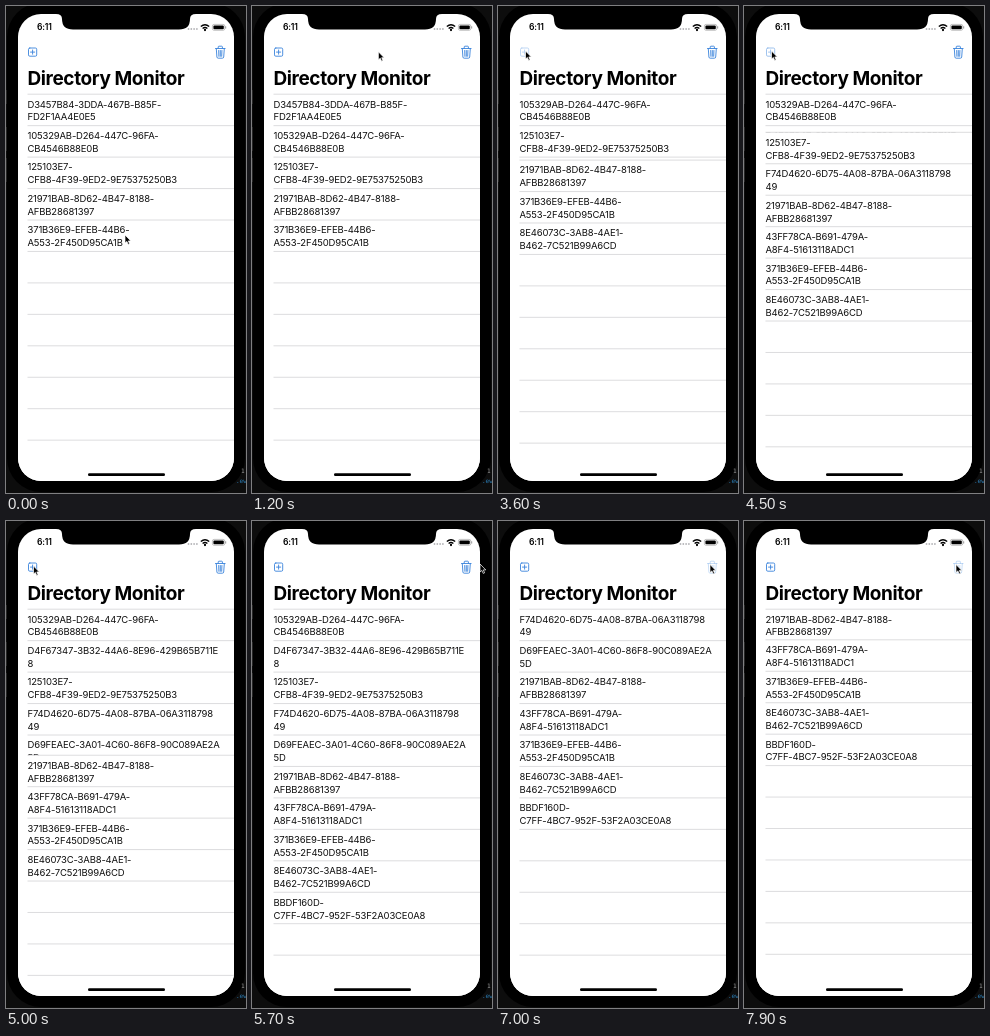
Animation of 240x487 px, one loop 8000 ms. Source, as an HTML page:

```html
<!DOCTYPE html>
<html lang="en">
<head>
<meta charset="utf-8">
<title>Directory Monitor</title>
<style>
  html, body { margin: 0; width: 100%; height: 100%; overflow: hidden; background: #0d0d0d; }
  svg { display: block; width: 100%; height: 100%; }
  text { font-family: Inter, "Liberation Sans", sans-serif; fill: #000; }
  .row text { font-size: 9.5px; letter-spacing: -.18px; fill: #111; }
  .row line { stroke: #d4d4d6; stroke-width: .8; }
  .title { font-size: 19px; font-weight: 700; letter-spacing: -.4px; }
  .clock { font-size: 8.6px; font-weight: 600; letter-spacing: -.2px; }
  .icon { fill: none; stroke: #3a84dc; stroke-width: .9; stroke-linecap: round; stroke-linejoin: round; }
  .code { font-family: "DejaVu Sans Mono", monospace; font-size: 6px; }
</style>
</head>
<body>
<svg viewBox="0 0 240 487" preserveAspectRatio="none">
  <defs>
    <clipPath id="screen"><rect x="12" y="8" width="216" height="467" rx="23"/></clipPath>
  </defs>
  <rect width="240" height="487" fill="#0d0d0d"/>
  <rect x="1" y="-3" width="238" height="489" rx="34"/>
  <path d="M.5 84v14M.5 121v24M.5 152v24" stroke="#262626"/>
  <text class="code" x="235" y="467" style="fill:#999">1</text>
  <text class="code" x="230" y="477" style="fill:#2b7fb8">.ew</text>

  <g clip-path="url(#screen)">
    <rect x="12" y="8" width="216" height="467" fill="#fff"/>
    <g id="list"></g>
    <path d="M50 7H190V8Q184 8 184 13Q184 23.500 173 23.500H67Q56 23.500 56 13Q56 8 50 8Z"/>
    <text class="clock" x="31" y="24.300">6:11</text>
    <g fill="#b5b5b8">
      <circle cx="182.500" cy="23" r=".9"/><circle cx="185.300" cy="23" r=".9"/>
      <circle cx="188.100" cy="23" r=".9"/><circle cx="190.900" cy="23" r=".9"/>
    </g>
    <g fill="none" stroke="#000" stroke-width="1.300">
      <path d="M194.800 20.600Q199 16.800 203.200 20.600M196.600 22.500Q199 20.400 201.400 22.500"/>
      <circle cx="199" cy="24" r=".5"/>
    </g>
    <rect x="206.400" y="18.400" width="12.400" height="5.900" rx="1.700" fill="none" stroke="#999" stroke-width=".6"/>
    <rect x="207.400" y="19.400" width="10.400" height="3.900" rx="1"/>
    <path d="M219.700 20.300v2.200" stroke="#999"/>
    <text class="title" x="21.500" y="79.300">Directory Monitor</text>
    <g id="add" class="icon">
      <rect x="22.500" y="42" width="8.200" height="8.200" rx="1.300"/>
      <path d="M26.600 44v4.200M24.500 46.100h4.200"/>
    </g>
    <g id="trash" class="icon">
      <path d="M209.500 42.500h9.600M212.200 42.300v-1.300q0-.8.8-.8h2.600q.8 0 .8.800v1.300M210.300 42.700l.6 8.300q.1 1.200 1.300 1.200h4.200q1.200 0 1.300-1.200l.6-8.300M212.700 44.500l.2 5.800M214.300 44.500v5.800M215.900 44.500l-.2 5.800"/>
    </g>
    <rect x="82" y="467.300" width="77" height="2.700" rx="1.350"/>
  </g>
  <path id="pointer" d="M0 0V8L1.900 6.400L3.200 9.400L4.600 8.800L3.300 5.900H5.800Z" fill="#000" stroke="#fff" stroke-width=".7"/>
</svg>
<script>
const LOOP = 8000, TOP = 88.2, PITCH = 31.45, SLIDE = 320;
const SVG = "http://www.w3.org/2000/svg";
const byId = id => document.getElementById(id);

// Two text lines, then when the row is added and removed.
const rows = [
  ["D3457B84-3DDA-467B-B85F-", "FD2F1AA4E0E5", null, 1450],
  ["105329AB-D264-447C-96FA-", "CB4546B88E0B", null, 6050],
  ["D4F67347-3B32-44A6-8E96-429B65B711E", "8", 4406, 6350],
  ["125103E7-", "CFB8-4F39-9ED2-9E75375250B3", null, 6650],
  ["F74D4620-6D75-4A08-87BA-06A3118798", "49", 3540, 7030],
  ["D69FEAEC-3A01-4C60-86F8-90C089AE2A", "5D", 4810, 7410],
  ["21971BAB-8D62-4B47-8188-", "AFBB28681397", null, 7870],
  ["43FF78CA-B691-479A-", "A8F4-51613118ADC1", 3980, null],
  ["371B36E9-EFEB-44B6-", "A553-2F450D95CA1B", null, null],
  ["8E46073C-3AB8-4AE1-", "B462-7C521B99A6CD", 2880, null],
  ["BBDF160D-", "C7FF-4BC7-952F-53F2A03CE0A8", 5180, null]
].map(([first, second, added, removed]) => ({ first, second, added, removed }));

// Pointer stops: time, x, y.
const path = [
  [0, 119, 229], [550, 119, 229], [900, 27, 45], [1000, 27, 45], [1390, 217, 46.5],
  [1850, 217, 46.5], [2120, 124, 36], [2390, 27.5, 45], [5300, 27.5, 45],
  [5500, 130, 36], [5700, 228, 43], [5830, 228, 43], [6030, 212, 43.5], [LOOP, 212, 43.5]
];

const clamp = x => Math.max(0, Math.min(1, x));
const ease = x => { x = clamp(x); return x * x * (3 - 2 * x); };

function make(tag, attrs, parent, text = "") {
  const el = document.createElementNS(SVG, tag);
  for (const key in attrs) el.setAttribute(key, attrs[key]);
  el.textContent = text;
  return parent.appendChild(el);
}

// Each row is opaque, so it covers the end of the row above while sliding.
function makeRow(first, second) {
  const g = make("g", { class: "row" }, byId("list"));
  make("rect", { x: 12, width: 216, height: PITCH + 1, fill: "#fff" }, g);
  const words = make("g", {}, g);
  make("text", { x: 21.5, y: 13.4 }, words, first);
  make("text", { x: 21.5, y: 26.3 }, words, second);
  const line = make("line", { x1: 21.5, x2: 228, y1: 0, y2: 0 }, g);
  return { g, words, line };
}

for (const row of rows) Object.assign(row, makeRow(row.first, row.second));
const blanks = Array.from({ length: 12 }, () => makeRow("", ""));

function presence({ added, removed }, t) {
  const grown = added === null ? 1 : ease((t - added) / SLIDE);
  const gone = removed === null ? 0 : ease((t - removed) / SLIDE);
  return grown * (1 - gone);
}

function place(row, y) {
  row.g.setAttribute("transform", `translate(0 ${y.toFixed(2)})`);
  row.line.style.opacity = y < 463 ? 1 : 0;
}

function buttonOpacity(key, t) {
  return Math.min(...rows.filter(r => r[key] !== null).map(r => {
    const age = t - r[key];
    return age < -60 ? 1 : 0.3 + 0.7 * clamp((age - 50) / 130);
  }));
}

function pointerAt(t) {
  const i = Math.max(1, path.findIndex(p => p[0] > t));
  const [a, b] = [path[i - 1], path[i]];
  const k = ease((t - a[0]) / (b[0] - a[0]));
  return [a[1] + (b[1] - a[1]) * k, a[2] + (b[2] - a[2]) * k];
}

function draw(t) {
  let y = TOP;
  for (const row of rows) {
    const p = presence(row, t);
    row.g.style.display = p > 0 ? "" : "none";
    row.words.style.opacity = Math.min(1, p * 2.5);
    place(row, y);
    y += p * PITCH;
  }
  blanks.forEach((row, i) => place(row, y + i * PITCH));
  byId("add").style.opacity = buttonOpacity("added", t);
  byId("trash").style.opacity = buttonOpacity("removed", t);
  byId("pointer").setAttribute("transform", `translate(${pointerAt(t)})`);
}

const start = performance.now();
function tick() {
  draw((performance.now() - start) % LOOP);
  requestAnimationFrame(tick);
}
tick();
</script>
</body>
</html>
```
